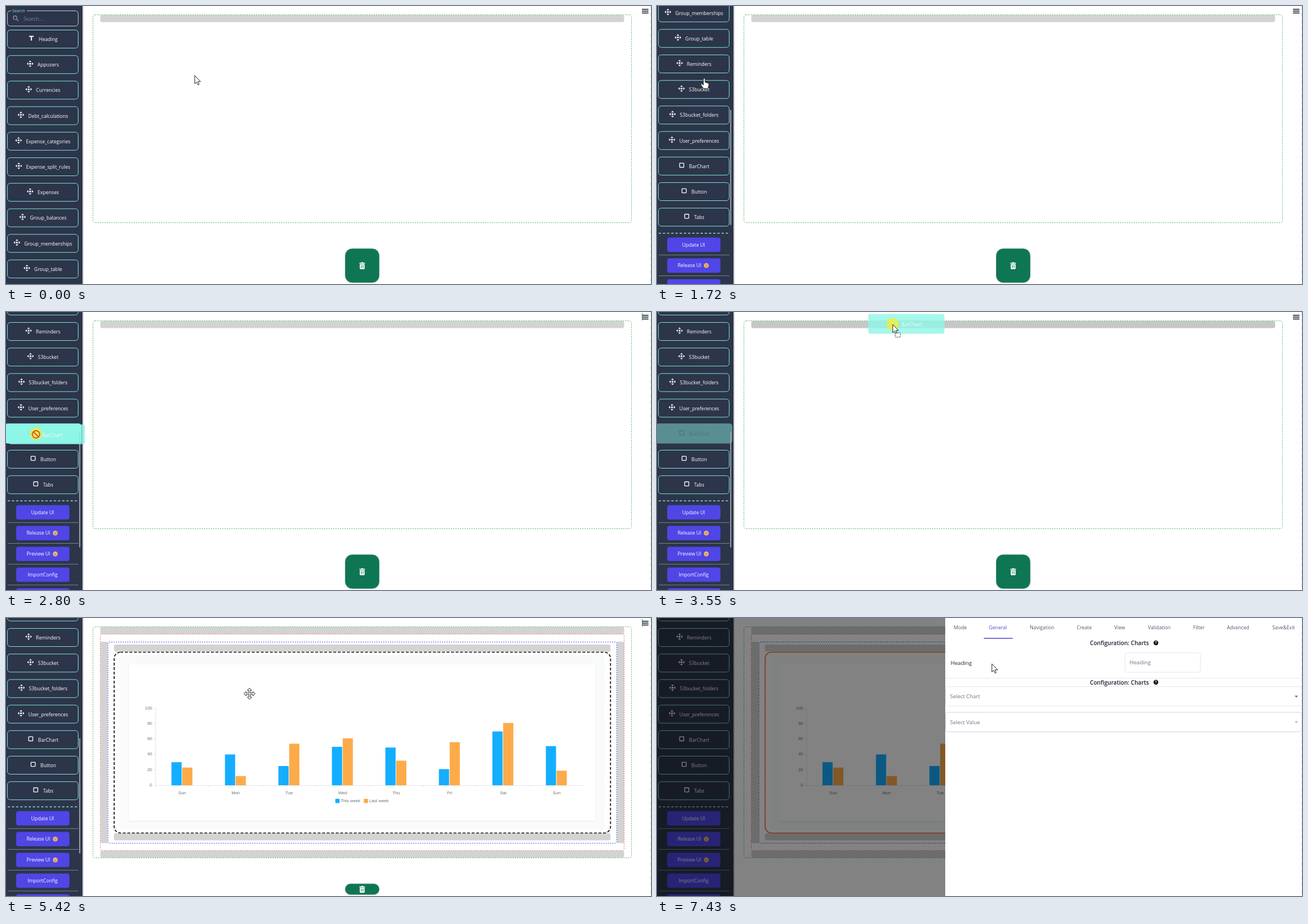
Animation of 1139x492 px, one loop 7500 ms. Source, as an HTML page with a canvas:

```html
<!DOCTYPE html>
<html lang="en">
<head>
<meta charset="utf-8">
<title>UI builder</title>
<style>
  html, body { margin: 0; width: 100%; height: 100%; overflow: hidden; background: #fff; }
  canvas { display: block; }
</style>
</head>
<body>
<canvas id="stage" width="1139" height="492"></canvas>
<script>
const W = 1139, H = 492, LOOP = 7500;
const PRESS = 2780, DROP = 4070, RENDERED = 4360, OPEN = 5630, TAB_CLICK = 6790;
const NAVY = '#2c354a', TEAL = '#7fe3d6', MINT = '#8ff7e7', GREY = '#d3d3d3';
const UI = '"Open Sans", "Noto Sans", sans-serif', CHART = '"Liberation Sans", Arial, sans-serif';
const ctx = document.getElementById('stage').getContext('2d');

const items = ['Heading', 'Appusers', 'Currencies', 'Debt_calculations', 'Expense_categories',
  'Expense_split_rules', 'Expenses', 'Group_balances', 'Group_memberships', 'Group_table', 'Reminders',
  'S3bucket', 'S3bucket_folders', 'User_preferences', 'BarChart', 'Button', 'Tabs'];
const BAR_ITEM = items.indexOf('BarChart');
const actions = ['Update UI', 'Release UI', 'Preview UI', 'ImportConfig', ''];
const days = ['Sun', 'Mon', 'Tue', 'Wed', 'Thu', 'Fri', 'Sat', 'Sun'];
const thisWeek = [30, 40, 25, 50, 49, 21, 70, 51];
const lastWeek = [23, 12, 54, 61, 32, 56, 81, 19];
const tabs = [['Mode', 535.5], ['General', 602], ['Navigation', 680], ['Create', 754.5], ['View', 817],
  ['Validation', 887], ['Filter', 957], ['Advanced', 1026], ['Save&Exit', 1106.5]];

const scrollKeys = [[490, 0], [1520, 408], [1720, 408], [2250, 476]];
const pointerKeys = [[70, 333, 123], [500, 84, 129], [1720, 84, 129], [2450, 66, 338], [2560, 66, 338],
  [2770, 53, 216], [2850, 53, 216], [3500, 416, 22], [4360, 416, 22], [4900, 430, 134], [5620, 430, 134],
  [5700, 433, 134], [5850, 433, 134], [6320, 590, 19], [6790, 590, 19], [7400, 591, 81]];
const ghostKeys = [[2850, 5, 199], [3500, 373, 3.5]];

// Smooth interpolation between [time, ...values] keys.
function track(t, keys) {
  const i = keys.findIndex(k => k[0] > t);
  if (i < 1) return keys.at(i).slice(1);
  const [a, b] = [keys[i - 1], keys[i]];
  const u = (t - a[0]) / (b[0] - a[0]), s = u * u * (3 - 2 * u);
  return a.slice(1).map((v, j) => v + (b[j + 1] - v) * s);
}
const progress = (t, from, to) => Math.min(1, Math.max(0, (t - from) / (to - from)));
const easeOut = u => 1 - (1 - u) ** 3;
const blink = (t, start) => t >= start && (t - start) % 1060 < 530;

function box(x, y, w, h, r, fill, stroke, dash = [], width = 1) {
  ctx.beginPath();
  ctx.roundRect(x, y, w, h, r);
  if (fill) { ctx.fillStyle = fill; ctx.fill(); }
  if (stroke) {
    ctx.strokeStyle = stroke; ctx.lineWidth = width;
    ctx.setLineDash(dash); ctx.stroke(); ctx.setLineDash([]);
  }
}
function line(x1, y1, x2, y2, color, width = 1, dash = []) {
  ctx.beginPath(); ctx.moveTo(x1, y1); ctx.lineTo(x2, y2);
  ctx.strokeStyle = color; ctx.lineWidth = width;
  ctx.setLineDash(dash); ctx.stroke(); ctx.setLineDash([]);
}
function disc(x, y, r, fill) {
  ctx.beginPath(); ctx.arc(x, y, r, 0, 7);
  ctx.fillStyle = fill; ctx.fill();
}
function text(str, x, y, color, { size = 8.7, weight = 400, align = 'left', family = UI } = {}) {
  ctx.font = `${weight} ${size}px ${family}`;
  ctx.textAlign = align;
  ctx.fillStyle = color;
  ctx.fillText(str, x, y + size * .36);
  return ctx.measureText(str).width;
}
function shape(x, y, path, fill, stroke) {
  ctx.save();
  ctx.translate(x, y);
  const p = new Path2D(path);
  ctx.fillStyle = fill; ctx.fill(p);
  if (stroke) { ctx.strokeStyle = stroke; ctx.lineWidth = 1; ctx.lineJoin = 'round'; ctx.stroke(p); }
  ctx.restore();
}
// Repeats one shape in the four directions.
function compass(x, y, path, fill, stroke) {
  for (let i = 0; i < 4; i++) {
    ctx.save();
    ctx.translate(x, y);
    ctx.rotate(i * Math.PI / 2);
    shape(0, 0, path, fill, stroke);
    ctx.restore();
  }
}

function itemLabel(i, x, y, color) {
  const w = text(items[i], x, y + .5, color, { size: 8.6, weight: 500, align: 'center' });
  const ix = x - w / 2 - 13;
  if (i === 0) shape(ix, y - 1.8, 'M-4-4H4V-2H1V4.5H-1V-2H-4Z', color);
  else if (i >= BAR_ITEM) box(ix - 3.6, y - 5.2, 7.4, 7.4, .8, null, color, [], 1.3);
  else {
    compass(ix, y - 1.5, 'M0-5.8L2.1-3.7L1-2.7L0-3.7L-1-2.7L-2.1-3.7Z', color);
    disc(ix, y - 1.5, 1.7, color);
  }
}

function drawItem(i, y, hovered, dragAlpha) {
  const dragged = dragAlpha && i === BAR_ITEM;
  if (hovered || dragged) {
    ctx.globalAlpha = dragged ? dragAlpha : 1;
    box(-2, y - 18, 135, 35.5, 5, MINT);
    ctx.globalAlpha = 1;
    itemLabel(i, 74.5, y, dragged ? 'rgba(45,75,85,.35)' : '#fff');
  } else {
    box(2.5, y - 16, 125, 32, 5, null, TEAL);
    itemLabel(i, 74.5, y, '#fff');
  }
}

function face(x, y) {
  disc(x, y, 4.3, '#f3bd72');
  disc(x - 1.5, y - 1, .7, '#5d4037');
  disc(x + 1.5, y - 1, .7, '#5d4037');
  line(x - 1.7, y + 1.6, x + 1.7, y + 1.6, '#a0522d', 1);
}

function drawSidebar(t, px, py) {
  const [scroll] = track(t, scrollKeys);
  box(0, 0, 135, H, 0, NAVY);
  box(135, 0, 2, H, 0, '#c9c9cd');
  ctx.save();
  ctx.beginPath(); ctx.rect(0, 0, 135, H); ctx.clip();
  ctx.translate(0, -scroll);

  box(2.5, 8.5, 125, 27, 5, null, '#c3cadb');
  box(9, 6, 28, 5, 0, NAVY);
  text('Search', 11, 8, TEAL, { size: 7.2 });
  ctx.beginPath(); ctx.arc(16, 20.7, 3.2, 0, 7);
  ctx.strokeStyle = '#8791a3'; ctx.lineWidth = 1.3; ctx.stroke();
  line(18.3, 23, 22, 26.7, '#8791a3', 1.5);
  text('Search...', 31, 22.5, '#78839a');

  const dragging = t >= PRESS && t < RENDERED;
  const dragAlpha = dragging ? track(t, [[2850, 1], [3350, .46]])[0] : 0;
  items.forEach((_, i) => {
    const y = 58.5 + 45.2 * i;
    const hovered = t > 1720 && t < PRESS && px < 128 && Math.abs(py + scroll - y) < 16;
    drawItem(i, y, hovered, dragAlpha);
  });

  line(3, 810.3, 128, 810.3, TEAL, 1.6, [4, 3.4]);
  actions.forEach((label, i) => {
    const y = 830.5 + 36.8 * i, smiling = i === 1 || i === 2;
    box(18, y - 12.7, 94, 25.4, 4, '#4f46e5');
    text(label, smiling ? 57.3 : 64.7, y, '#fff', { size: 8.6, weight: 500, align: 'center' });
    if (smiling) face(87, y);
    line(3, y + 18.2, 128, y + 18.2, '#7c828d');
  });
  ctx.restore();
  if (t > 500 && t < OPEN) box(129.2, 10 + scroll * .426, 2, 204, 1, '#9da2ab');
}

function drawTrash(y, h, r) {
  box(598.5, y, 61, h, r, '#0f7653', '#cfd8d4');
  shape(629, y + h / 2, 'M-5-5H-2L-1.3-6H1.3L2-5H5V-3.4H-5ZM-4.3-2.8H4.3V5Q4.3 6.2 3 6.2H-3Q-4.3 6.2-4.3 5Z', '#fff');
  line(629 - 1.5, y + h / 2 - 1, 629 - 1.5, y + h / 2 + 4, '#0f7653', 1.1);
  line(629 + 1.5, y + h / 2 - 1, 629 + 1.5, y + h / 2 + 4, '#0f7653', 1.1);
}

function drawChart(t) {
  box(201, 65, 856, 310, 4, '#f9fafb');
  ctx.save();
  ctx.shadowColor = 'rgba(0,0,0,.12)'; ctx.shadowBlur = 2; ctx.shadowOffsetY = .5;
  box(217, 82, 824, 277, 3, '#fff');
  ctx.restore();

  const label = { size: 7.7, family: CHART, align: 'center' }, ink = '#6b7079', axis = '#e2e5ea';
  line(264.5, 160, 264.5, 296, axis);
  line(264, 296.5, 1020, 296.5, axis);
  for (let v = 0; v <= 100; v += 20) {
    const y = 295.5 - v * 1.363;
    line(261, y + .7, 264, y + .7, axis);
    text(v, 258, y - .3, ink, { ...label, size: 7.5, align: 'right' });
  }
  const grow = easeOut(progress(t, 4400, 5120)) * 1.36;
  days.forEach((day, i) => {
    const x = 311.2 + 94.45 * i;
    line(x - 47, 297, x - 47, 300, axis);
    box(x - 19, 296, 18, -thisWeek[i] * grow, 0, '#15aeff');
    box(x, 296, 18, -lastWeek[i] * grow, 0, '#fdab4a');
    text(day, x, 309, ink, label);
  });
  box(581.5, 320, 7.5, 7.5, 1, '#15aeff');
  text('This week', 591, 323.5, ink, { ...label, align: 'left' });
  box(631.8, 320, 7.5, 7.5, 1, '#fdab4a');
  text('Last week', 641.3, 323.5, ink, { ...label, align: 'left' });
}

function drawCanvasArea(t, py) {
  const rendered = t >= RENDERED;
  const over = t > PRESS && !rendered && py < 30;
  box(153.5, 15.5, 951, rendered ? 409 : 368, 4, null, '#58b05c', [2, 2]);
  box(166.5, 16, 925, 12.5, 3, over ? '#c7c7c7' : GREY);
  if (!rendered) return drawTrash(429, 61, 13);

  box(166.5, 412, 925, 12, 3, GREY);
  for (const x of [167, 1079]) box(x, 42, 12.5, 356.5, 2, GREY);
  for (const y of [47, 381]) box(190.5, y, 877, 12.5, 3, GREY);
  box(166.5, 28.5, 925, 383, 2, null, '#f87171', [2, 2]);
  box(180, 42.5, 898.5, 356, 2, null, '#5050f0', [2, 2]);
  drawChart(t);
  if (t < OPEN) box(191, 60.5, 876.5, 320, 11, null, '#111', [5, 3], 1.7);
  else box(191, 60.5, 876.5, 320, 11, null, '#ff7043', [], 1.7);
  drawTrash(470, 20, 10);
}

function sectionTitle(y) {
  text('Configuration: Charts', 764.5, y, '#1a202c', { size: 10.1, weight: 600 });
  disc(881, y - .8, 4.2, '#111');
  text('?', 881, y - .8, '#fff', { size: 6.5, weight: 700, align: 'center' });
}
function select(label, y, border, arrow) {
  box(509.5, y, 629.5, 34.5, 4, null, border);
  text(label, 517.5, y + 17.5, '#6b7688', { size: 9.5 });
  shape(1129, y + 17.5, 'M-3-1.5H3L0 1.7Z', arrow);
}

function drawDrawer(t) {
  const slide = easeOut(progress(t, OPEN, 5830));
  if (!slide) return;
  box(0, 0, W, H, 0, `rgba(0,0,0,${.49 * slide})`);
  ctx.save();
  ctx.translate(630 * (1 - slide), 0);
  box(509, 0, 630, H, 0, '#fff');
  const active = t < TAB_CLICK ? 0 : 1;
  tabs.forEach(([name, x], i) =>
    text(name, x, 17, i === active ? '#4b4fd0' : '#4f5a6c', { align: 'center' }));
  const [left, right] = [[514, 557], [577, 628]][active];
  line(left, 36, right, 36, '#4b47c8', 1.6);
  if (blink(t, active ? TAB_CLICK : 5580)) {
    const x = active ? 587.5 : 524.5;
    line(x, 11, x, 23, '#30364a');
  }
  if (active) {
    sectionTitle(44.8);
    text('Heading', 518.5, 79.5, '#1f2733', { size: 9.7 });
    box(826.5, 61.5, 133, 34.5, 4, null, '#e2e6ec');
    text('Heading', 834.5, 79, '#6b7688', { size: 9.7 });
    line(509, 106.5, W, 106.5, '#e6e8ec');
    sectionTitle(114.5);
    select('Select Chart', 121.5, '#e4e7ec', '#666');
    select('Select Value', 167, '#cfd4dc', '#b5b9c0');
  }
  ctx.restore();
}

function drawGhost(t) {
  if (t < PRESS || t >= DROP) return;
  const [x, y] = track(t, ghostKeys);
  ctx.globalAlpha = .8;
  box(x, y, 134.5, 35, 4, MINT);
  ctx.globalAlpha = 1;
  itemLabel(BAR_ITEM, x + 77, y + 18, 'rgba(255,255,255,.85)');
}

function drawPointer(t, x, y) {
  const dragging = t >= PRESS && t < DROP;
  if (dragging && t < 4030) disc(x, y - .5, 11, 'rgba(240,238,60,.8)');
  if (dragging && y > 30) {
    ctx.beginPath(); ctx.arc(x, y + .5, 6.5, 0, 7);
    ctx.strokeStyle = '#e0501e'; ctx.lineWidth = 2; ctx.stroke();
    return line(x - 4.6, y - 4, x + 4.6, y + 5, '#e0501e', 2);
  }
  if (t >= 5160 && t < OPEN) {
    compass(x, y, 'M0-10L4-6H1.3V-1.3H-1.3V-6H-4Z', '#fff', '#333');
    return box(x - 1.5, y - 1.5, 3, 3, 0, '#fff');
  }
  const onItem = x < 128 && t < PRESS, onTab = t > 6350 && y < 36;
  if (onItem || onTab) {
    return shape(x, y, 'M-2 0Q0-2 1 0V6L6 7.5Q8 8 7.5 11L6 17H-2L-6 11Q-7 9-5 8.5L-2 11Z', '#fff', '#333');
  }
  shape(x + .3, y, 'M0 0V14.5L3.3 11.5L5.6 16.6L7.8 15.6L5.6 10.8H10.2Z', '#fff', '#222');
  if (dragging) box(x + 4.5, y + 15, 9.5, 7.5, 1, 'rgba(255,255,255,.7)', '#222', [2, 1.2]);
}

function draw(t) {
  const [px, py] = track(t, pointerKeys);
  box(0, 0, W, H, 0, '#fff');
  drawCanvasArea(t, py);
  drawSidebar(t, px, py);
  for (const y of [5.8, 9.1, 12.4]) line(1123, y, 1134.5, y, '#1a1f2b', 1.6);
  if (blink(t, t < PRESS ? 90 : PRESS)) line(1123.5, 2, 1123.5, 15, '#3c7a5c');
  drawGhost(t);
  drawDrawer(t);
  line(1138.5, 0, 1138.5, H, '#dcdcdc', 1, [7, 5]);
  drawPointer(t, px, py);
}

function frame() {
  draw(performance.now() % LOOP);
  requestAnimationFrame(frame);
}
frame();
</script>
</body>
</html>
```
